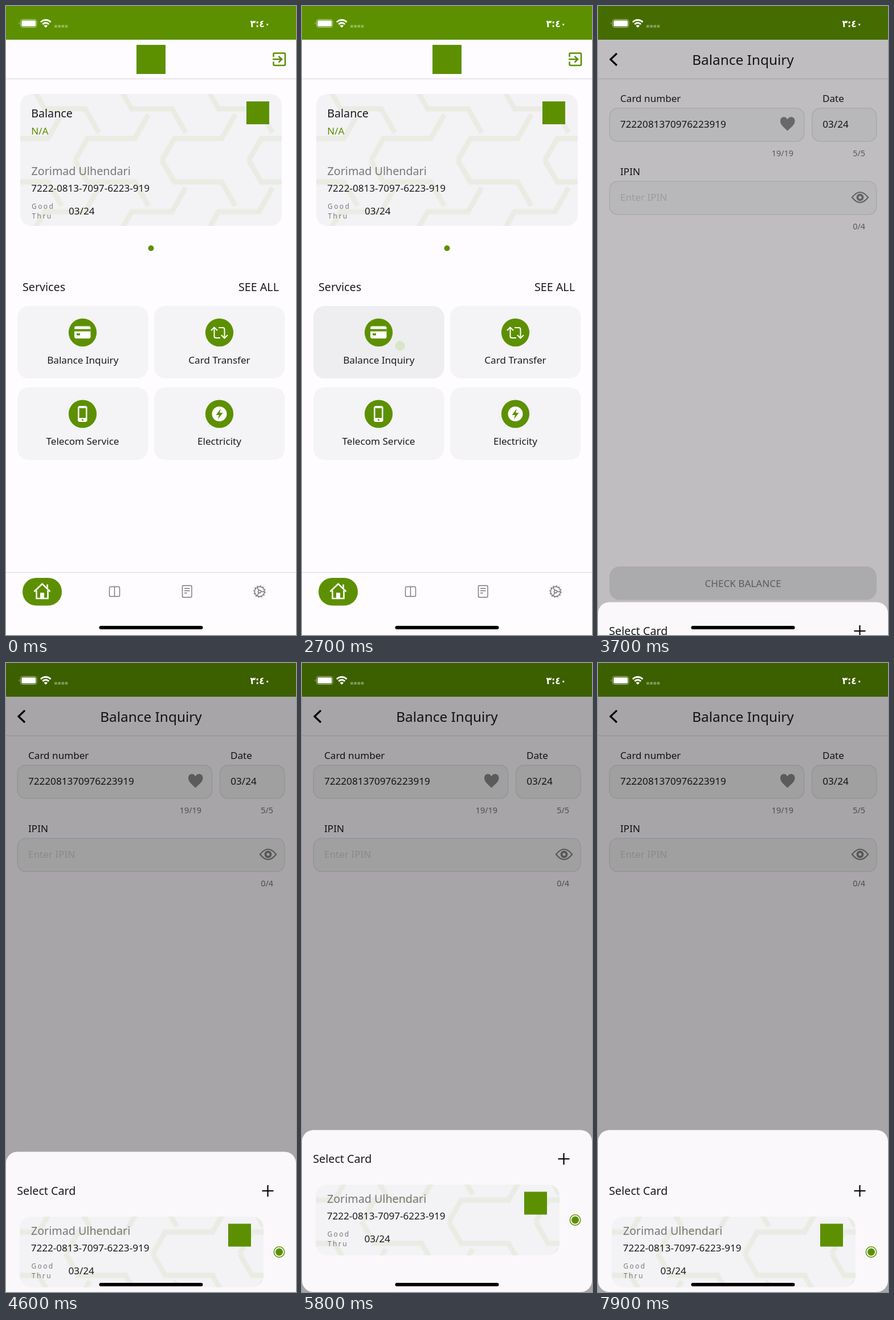
Animation of 509x1101 px, one loop 8000 ms. Source, as an HTML page:

```html
<!DOCTYPE html>
<html lang="en">
<head>
<meta charset="utf-8">
<title>Balance inquiry</title>
<style>
  html, body { margin: 0; width: 100%; height: 100%; overflow: hidden; background: #fefcff; }
  svg { display: block; width: 100vw; height: 100vh; }
  text { font: 17.1px "Noto Sans", "Open Sans", sans-serif; fill: #1b1b1d; white-space: pre; }
  .big { font-size: 19.7px; font-weight: 350; }
  .title { font-size: 24.4px; font-weight: 350; }
  .mid { text-anchor: middle; }
  .end { text-anchor: end; }
  .count { font-size: 14.4px; fill: #777; }
  .thru { font-size: 12px; letter-spacing: 2.4px; fill: #777; }
  .clock { font: bold condensed 17.5px "DejaVu Sans Condensed", "DejaVu Sans", sans-serif; fill: #fff; }
  .green { fill: #5c9000; }
  .panel { fill: #f4f3f5; }
  .field { fill: #f5f4f6; stroke: #e2e1e4; stroke-width: 1.5; }
  .rule { stroke: #e1e0e4; stroke-width: 1.3; }
  .line { fill: none; stroke-width: 2.2; }
  .grey { stroke: #777; stroke-width: 1.4; fill: none; }
  .white { fill: #fff; }
</style>
</head>
<body>
<svg viewBox="0 0 509 1101" preserveAspectRatio="none">
  <defs>
    <!-- one column of the honeycomb, upper half -->
    <g id="comb">
      <path d="M52 152L68 180H139L163 222M121 270L143 232H226L250 190"/>
    </g>
    <g id="column">
      <use href="#comb"/>
      <use href="#comb" transform="translate(0 540) scale(1 -1)"/>
    </g>
    <g id="honeycomb" fill="none" stroke="#e9ece3" stroke-width="9">
      <use href="#column" x="-152.5"/>
      <use href="#column"/>
      <use href="#column" x="152.5"/>
      <use href="#column" x="305"/>
    </g>
    <clipPath id="cardClip"><rect x="25" y="154" width="459" height="231" rx="20"/></clipPath>
    <clipPath id="rowClip"><rect x="24" y="913" width="428" height="123.500" rx="20"/></clipPath>
    <g id="cardText">
      <text class="big" x="44.500" y="295.500" style="fill:#777">Zorimad Ulhendari</text>
      <text x="44.300" y="325">7222-0813-7097-6223-919</text>
      <text class="thru" x="45" y="354.500">Good</text>
      <text class="thru" x="45.500" y="371.500">Thru</text>
      <text x="110" y="365">03/24</text>
    </g>
    <g id="tile">
      <rect x="20" y="525" width="229.500" height="127" rx="20" class="panel"/>
    </g>
    <circle id="badge" cx="134.500" cy="571.500" r="24.600" class="green"/>
  </defs>

  <g id="home">
    <rect width="509" height="1101" fill="#fefcff"/>
    <rect width="509" height="59" class="green"/>
    <rect x="229" y="68" width="51" height="51" class="green"/>
    <g class="line" stroke="#5c9000" style="stroke-width:2.600">
      <path d="M469.500 89V84.500Q469.500 82.500 471.500 82.500H488Q490 82.500 490 84.500V102Q490 104 488 104H471.500Q469.500 104 469.500 102V97.500"/>
      <path d="M468 93.300H483M478.500 88L484 93.300L478.500 98.600"/>
    </g>
    <path class="rule" d="M0 127.500H509M0 991.500H509"/>

    <g clip-path="url(#cardClip)">
      <rect x="25" y="154" width="459" height="231" fill="#f3f2f5"/>
      <use href="#honeycomb"/>
    </g>
    <rect x="422" y="167" width="40" height="40" class="green"/>
    <text class="big" x="44.200" y="194.500">Balance</text>
    <text x="44.200" y="225" style="fill:#5c9000;font-weight:350">N/A</text>
    <use href="#cardText"/>
    <circle cx="254.500" cy="424" r="5" class="green"/>

    <text class="big" x="29" y="499">Services</text>
    <text class="big end" x="479" y="499">SEE ALL</text>
    <use href="#tile"/><use href="#tile" x="240"/>
    <use href="#tile" y="142.500"/><use href="#tile" x="240" y="142.500"/>
    <g id="press">
      <rect x="20" y="525" width="229.500" height="127" rx="20" fill="#eeedef"/>
      <circle id="ripple" cx="172" cy="595" r="8.500" fill="#d8e5c7"/>
    </g>
    <use href="#badge"/><use href="#badge" x="240"/>
    <use href="#badge" y="142.500"/><use href="#badge" x="240" y="142.500"/>
    <text class="mid" x="134.800" y="625.500">Balance Inquiry</text>
    <text class="mid" x="374.500" y="625.500">Card Transfer</text>
    <text class="mid" x="134.500" y="768">Telecom Service</text>
    <text class="mid" x="374.500" y="768">Electricity</text>

    <rect x="120" y="560.500" width="28.500" height="21.500" rx="3" class="white"/>
    <path class="green" d="M120 565.500h28.500v4h-28.500zM124 573h6v3.500h-6z"/>
    <g class="line" stroke="#fff" style="stroke-width:2">
      <path d="M360 568L365.500 562.500L371 568M365.500 563V578Q365.500 581 368.500 581H376"/>
      <path d="M389 576L383.500 581.500L378 576M383.500 581V566Q383.500 563 380.500 563H373"/>
    </g>
    <rect x="126" y="700" width="16.500" height="28" rx="3.500" class="white"/>
    <rect x="128.500" y="704" width="11.500" height="17" class="green"/>
    <circle cx="134.300" cy="724.500" r="1.500" class="green"/>
    <circle cx="374.500" cy="714" r="13" class="white"/>
    <path class="green" d="M377 704.500L368.500 716H374L372 723.500L380.500 712H375Z"/>

    <rect x="29" y="1001" width="69" height="48.500" rx="24" class="green"/>
    <g class="line" stroke="#fff" style="stroke-width:2.600">
      <path d="M49.500 1025L63.500 1011.500L77.500 1025M72.500 1019V1012.500"/>
      <path d="M53.500 1023V1037H73.500V1023"/>
    </g>
    <rect x="60" y="1027" width="7" height="10" class="white"/>
    <rect x="181.500" y="1016.500" width="18" height="17" rx="2" class="grey"/>
    <path class="grey" d="M190.500 1016.500V1033.500"/>
    <rect x="309.500" y="1014.500" width="16.500" height="20.500" rx="2" class="grey"/>
    <path class="grey" d="M313 1019.500H322.500M313 1023.500H322.500M313 1027.500H318"/>
    <circle cx="445" cy="1025" r="8.500" class="grey"/>
    <circle cx="445" cy="1025" r="10" class="grey" style="stroke-dasharray:2.620 2.616"/>
    <circle cx="445" cy="1025" r="2.500" class="grey"/>
    <path class="grey" d="M447.500 1025H453.500M443.700 1022.800L440.800 1017.700M443.700 1027.200L440.800 1032.300"/>
  </g>

  <g id="inquiry">
    <rect width="509" height="1101" fill="#fefcff"/>
    <rect width="509" height="59" class="green"/>
    <path class="rule" d="M0 127.500H509"/>
    <path class="line" stroke="#000" style="stroke-width:3.200" d="M33 83L22 93.500L33 104"/>
    <text class="title mid" x="254.500" y="102.500">Balance Inquiry</text>
    <text x="39" y="167.500">Card number</text>
    <text x="394" y="167.500">Date</text>
    <rect x="20.300" y="179" width="341.500" height="58" rx="14" class="field"/>
    <rect x="375.800" y="179" width="113" height="58" rx="14" class="field"/>
    <text x="39" y="213">7222081370976223919</text>
    <text x="394.300" y="213">03/24</text>
    <path fill="#8b8a8d" d="M332.500 218.500C326 212 320 208 320 201.500C320 193 329.500 192 332.500 198.500C335.500 192 345.500 193 345.500 201.500C345.500 208 339 212 332.500 218.500Z"/>
    <text class="count end" x="343" y="263">19/19</text>
    <text class="count end" x="469" y="263">5/5</text>
    <text x="39" y="296">IPIN</text>
    <rect x="20.300" y="307" width="468.500" height="58" rx="14" class="field"/>
    <text x="39" y="341" style="fill:#d0cfd2">Enter IPIN</text>
    <g class="line" stroke="#858487">
      <path d="M446 335Q460 317 474 335Q460 353 446 335Z"/>
      <circle cx="460" cy="335" r="4.500" style="stroke-width:4"/>
    </g>
    <text class="count end" x="469" y="391">0/4</text>
    <rect x="20" y="981" width="469" height="58.500" rx="18" fill="#e4e3e5"/>
    <text class="mid" x="254.500" y="1017" style="fill:#7a797c">CHECK BALANCE</text>
  </g>

  <rect id="shade" width="509" height="1101"/>
  <g id="sheet">
    <rect y="817.500" width="509" height="283.500" rx="20" fill="#faf8fb"/>
    <g id="content">
      <text class="big" x="19.300" y="875">Select Card</text>
      <path class="line" stroke="#000" d="M449.500 868H469.500M459.500 858V878"/>
      <g clip-path="url(#rowClip)">
        <rect x="24" y="913" width="428" height="124" fill="#f3f2f5"/>
        <use href="#honeycomb" x="-16" y="708"/>
      </g>
      <rect x="390" y="925.500" width="40" height="40" class="green"/>
      <use href="#cardText" x="-0.600" y="649"/>
      <circle cx="479.500" cy="975" r="9.200" class="line" stroke="#5c9000" style="stroke-width:1.500"/>
      <circle cx="479.500" cy="975" r="6.500" class="green"/>
    </g>
  </g>

  <!-- system status bar and home indicator -->
  <rect x="25.500" y="23.500" width="28.500" height="14" rx="4" fill="none" stroke="#fff" stroke-opacity=".6"/>
  <rect x="27.300" y="25.300" width="25" height="10.400" rx="2.500" class="white"/>
  <path d="M23.500 28.500Q21.500 30.500 23.500 32.500Z" class="white" opacity=".6"/>
  <g fill="none" stroke="#fff" stroke-width="3">
    <path d="M61 28.300A12 12 0 0 1 78.500 28.300M64.300 32A7.400 7.400 0 0 1 75.200 32"/>
  </g>
  <path class="white" d="M69.700 38L66.500 34.700A4.600 4.600 0 0 1 73 34.700Z"/>
  <path d="M85 35.500H108.500" stroke="#fff" stroke-opacity=".35" stroke-width="4.600" stroke-dasharray="4.700 1.500"/>
  <text class="clock mid" x="446" y="36.500">٣:٤٠</text>
  <rect x="163.500" y="1085" width="182" height="6" rx="3"/>
</svg>
<script>
const LOOP = 8000, STEP = 100, WIDTH = 509, REST = 817;
const el = id => document.getElementById(id);
const [home, inquiry, press, ripple, shade, sheet, content] =
  ['home', 'inquiry', 'press', 'ripple', 'shade', 'sheet', 'content'].map(el);

// Tracks are lists of [time, value].
const slide = [[2700, 0], [2800, .3], [2900, .8], [3000, 1]];
const dim = [[3600, 0], [3700, .25], [3800, .345]];
const sheetTop = [[3600, 1101], [3700, 1043], [3800, 915], [3900, 852], [4000, 825], [4100, REST],
  [4300, REST], [4600, 855], [5000, 890], [5500, 825], [5800, REST],
  [6900, REST], [7000, 885], [7100, 988], [7300, 975], [7600, REST]];
const pull = [[4300, 0], [4600, 18], [5000, 40], [5500, 10], [5800, 0],
  [6900, 0], [7000, 60], [7100, 90], [7300, 80], [7600, 0], [7700, 0], [7900, 56]];

function at(track, t) {
  const i = track.findIndex(key => key[0] > t);
  if (i < 0) return track[track.length - 1][1];
  if (i === 0) return track[0][1];
  const [t0, a] = track[i - 1], [t1, b] = track[i];
  return a + (b - a) * (t - t0) / (t1 - t0);
}

const move = (node, x, y) => node.setAttribute('transform', `translate(${x} ${y})`);
const show = (node, on) => node.setAttribute('visibility', on ? 'visible' : 'hidden');

function draw(now) {
  const t = Math.floor(now % LOOP / STEP) * STEP;
  const p = at(slide, t);
  move(home, -150 * p, 0);
  move(inquiry, WIDTH * (1 - p), 0);
  show(inquiry, p > 0);
  show(press, t >= 2700 && p < 1);
  ripple.setAttribute('r', 8.5 + 20 * p);
  shade.setAttribute('opacity', at(dim, t));
  show(sheet, t > 3600);
  move(sheet, 0, at(sheetTop, t) - REST);
  move(content, 0, at(pull, t));
}

const start = performance.now();
function tick() {
  draw(performance.now() - start);
  requestAnimationFrame(tick);
}
tick();
</script>
</body>
</html>
```
